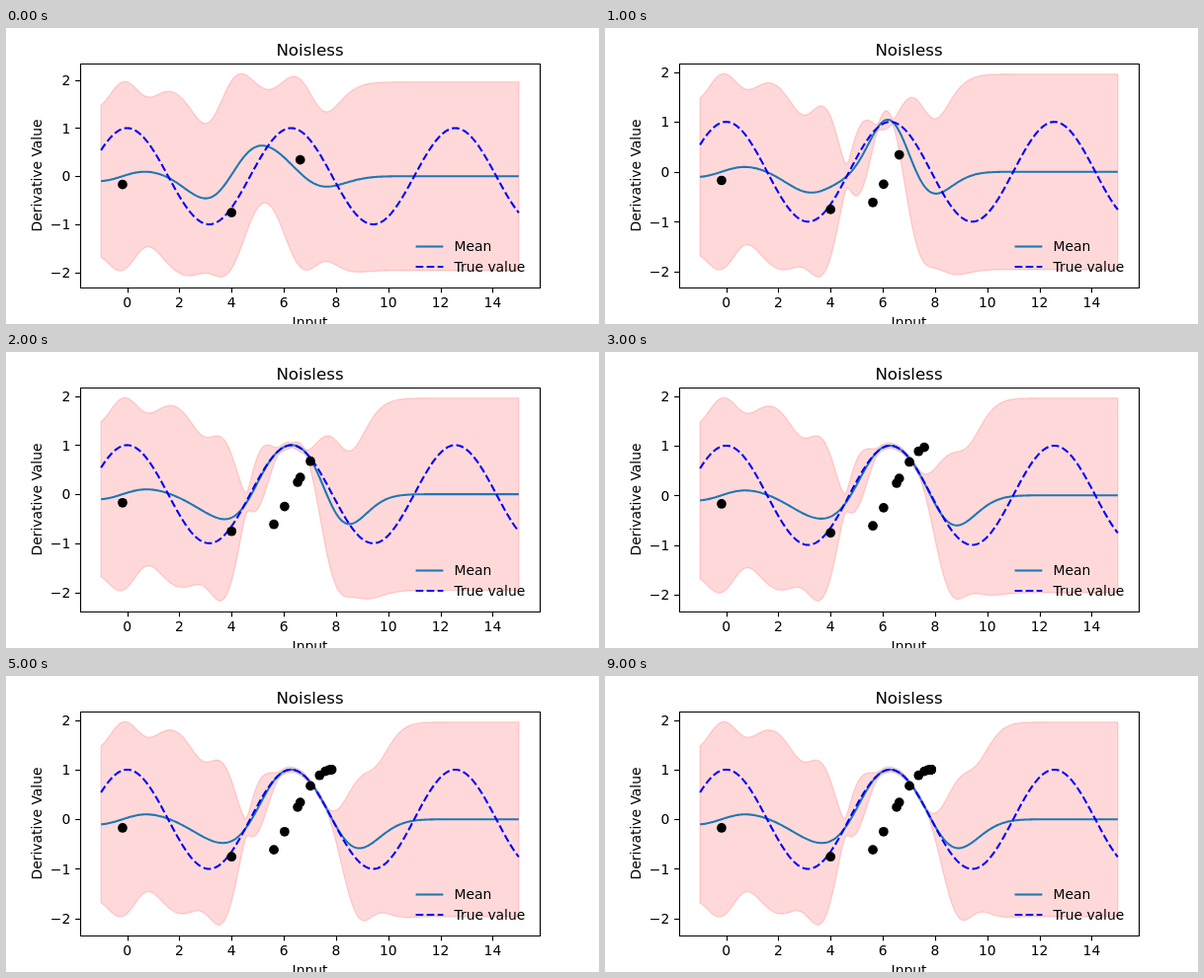
These frames come from a looping animation (600x300 px, 10000 ms). An HTML page with a canvas:

```html
<!DOCTYPE html>
<html lang="en">
<head>
<meta charset="utf-8">
<title>Gaussian process derivative</title>
<style>
  html, body { margin: 0; width: 100%; height: 100%; overflow: hidden; background: #fff; }
  canvas { display: block; }
</style>
</head>
<body>
<canvas id="plot" width="600" height="300"></canvas>
<script>
const ctx = document.getElementById('plot').getContext('2d');
const LOOP = 10000, STEP = 500, NOISE = 1e-4;
const PT = 100 / 72;
const LEFT = 75, RIGHT = 540, TOP = 36, BOTTOM = 262.5;

// Three initial samples, then gradient ascent towards the maximum of sin
const samples = [-0.175, 4, 6.63, 5.62, 6.03, 6.53, 7.02, 7.37, 7.59];
while (samples.length < 3 + LOOP / STEP) {
  const last = samples[samples.length - 1];
  samples.push(last + 0.5 * Math.cos(last));
}
const grid = Array.from({ length: 401 }, (_, i) => -1 + i * 0.04);

const kernel = d => Math.exp(-d * d / 2);
const dot = (a, b) => a.reduce((sum, v, i) => sum + v * b[i], 0);

function invert(matrix) {
  const n = matrix.length;
  const rows = matrix.map((row, i) => [...row, ...row.map((_, j) => +(i === j))]);
  for (let i = 0; i < n; i++) {
    const pivot = rows[i][i];
    rows[i] = rows[i].map(v => v / pivot);
    for (let r = 0; r < n; r++) {
      if (r === i) continue;
      const factor = rows[r][i];
      rows[r] = rows[r].map((v, j) => v - factor * rows[i][j]);
    }
  }
  return rows.map(row => row.slice(n));
}

// Posterior of the derivative, given noiseless values of sin
function posterior(xs) {
  const inverse = invert(xs.map((a, i) => xs.map((b, j) => kernel(a - b) + (i === j ? NOISE : 0))));
  const ys = xs.map(Math.sin);
  const weights = inverse.map(row => dot(row, ys));
  const mean = [], upper = [], lower = [];
  for (const x of grid) {
    const k = xs.map(p => (p - x) * kernel(p - x));
    const m = dot(k, weights);
    const variance = 1 - dot(k, inverse.map(row => dot(row, k)));
    const spread = 1.96 * Math.sqrt(Math.max(0, variance));
    mean.push(m);
    upper.push(m + spread);
    lower.push(m - spread);
  }
  return { mean, upper, lower };
}

const snap = v => Math.floor(v + 0.5) + 0.5;
const toX = x => LEFT + (x + 1.8) / 17.6 * (RIGHT - LEFT);

function line(points, color, width, dash = []) {
  ctx.beginPath();
  points.forEach(([x, y]) => ctx.lineTo(x, y));
  ctx.strokeStyle = color;
  ctx.lineWidth = width * PT;
  ctx.setLineDash(dash.map(d => d * width * PT));
  ctx.stroke();
}

function text(label, x, y, align = 'center', size = 10) {
  ctx.font = `${size * PT}px "DejaVu Sans", sans-serif`;
  ctx.textAlign = align;
  ctx.fillStyle = '#000';
  ctx.fillText(label, x, y);
}

function draw(step) {
  const xs = samples.slice(0, 3 + step);
  const { mean, upper, lower } = posterior(xs);
  const low = Math.min(...lower), high = Math.max(...upper);
  const margin = (high - low) * 0.05;
  const scale = (BOTTOM - TOP) / (high - low + 2 * margin);
  const toY = y => BOTTOM - (y - low + margin) * scale;
  const curve = ys => ys.map((y, i) => [toX(grid[i]), toY(y)]);

  ctx.fillStyle = '#fff';
  ctx.fillRect(0, 0, 600, 300);
  ctx.lineJoin = 'round';

  const band = [...curve(upper), ...curve(lower).reverse()];
  line([...band, band[0]], 'rgba(255,0,0,.15)', 1);
  ctx.fillStyle = 'rgba(255,0,0,.15)';
  ctx.fill();

  const meanStyle = ['#1f77b4', 1.5];
  const trueStyle = ['#00f', 1.5, [3.7, 1.6]];
  line(curve(mean), ...meanStyle);
  line(curve(grid.map(Math.cos)), ...trueStyle);

  ctx.fillStyle = '#000';
  for (const x of xs) {
    ctx.beginPath();
    ctx.arc(toX(x), toY(Math.sin(x)), 3.5 * PT, 0, 2 * Math.PI);
    ctx.fill();
  }

  for (let v = 0; v <= 14; v += 2) {
    const x = snap(toX(v));
    line([[x, BOTTOM + 1], [x, BOTTOM + 1 + 3.5 * PT]], '#000', 0.8);
    text(v, toX(v), 283);
  }
  for (let v = -2; v <= 2; v++) {
    const y = snap(toY(v));
    line([[LEFT, y], [LEFT - 3.5 * PT, y]], '#000', 0.8);
    text(String(v).replace('-', '\u2212'), LEFT - 7 * PT, Math.round(toY(v) + 5.3), 'right');
  }
  ctx.setLineDash([]);
  ctx.strokeRect(snap(LEFT), snap(TOP), RIGHT - LEFT, snap(BOTTOM) - snap(TOP));

  text('Noisless', 307.5, 28, 'center', 12);
  text('Input', 307.5, 303);
  ctx.save();
  ctx.translate(36, 149.5);
  ctx.rotate(-Math.PI / 2);
  text('Derivative Value', 0, 0);
  ctx.restore();

  line([[414.6, 221.5], [442.4, 221.5]], ...meanStyle);
  line([[414.6, 242], [442.4, 242]], ...trueStyle);
  text('Mean', 453.5, 226, 'left');
  text('True value', 453.5, 247, 'left');
}

let shown = -1;
function tick() {
  const step = Math.floor(performance.now() % LOOP / STEP);
  if (step !== shown) draw(shown = step);
  requestAnimationFrame(tick);
}
tick();
</script>
</body>
</html>
```
